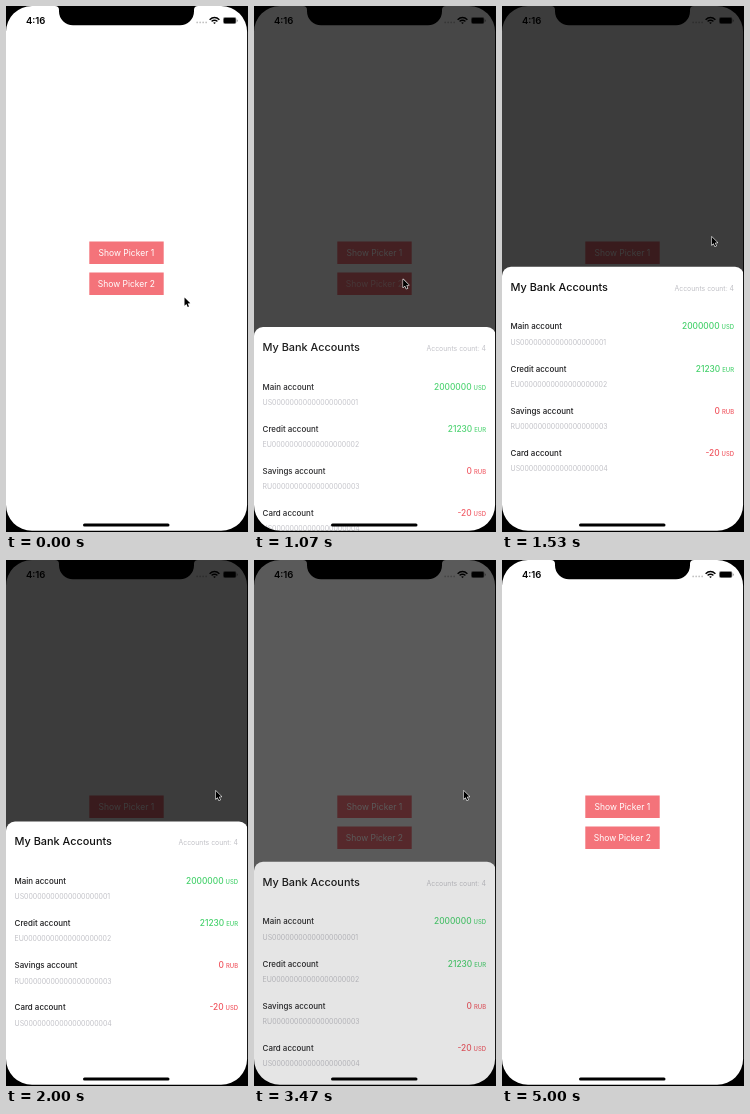
Animation of 242 by 526 pixels, one loop 5140 ms. Source, as an HTML page with a canvas:

```html
<!DOCTYPE html>
<html lang="en">
<head>
<meta charset="utf-8">
<title>Account picker</title>
<style>
  html, body { margin: 0; width: 100%; height: 100%; overflow: hidden; background: #000; }
  canvas { display: block; width: 242px; height: 526px; }
</style>
</head>
<body>
<canvas id="stage"></canvas>
<script>
const W = 242, H = 526, LOOP = 5140, TICK = 1000 / 15;
const SHEET_TOP = 261.5, SHEET_H = H - SHEET_TOP, DIM = 0.765;
const OPEN_AT = 872, FADE_MS = 255, CLOSE_AT = 3423, CLOSE_MS = 177;
const FONT = 'Inter, "Liberation Sans", sans-serif';
const CORAL = '#f4737a', GREEN = '#46d16c', RED = '#f0555f', MUTED = '#c0c0c6';

const ACCOUNTS = [
  ['Main account', 'US', '2000000', 'USD', GREEN],
  ['Credit account', 'EU', '21230', 'EUR', GREEN],
  ['Savings account', 'RU', '0', 'RUB', RED],
  ['Card account', 'US', '-20', 'USD', RED]
];

// time, x, y of the pointer tip
const POINTER = [
  [200, 178.5, 291.5], [467, 133, 276], [600, 131.2, 279.5],
  [1000, 131.2, 279.5], [1267, 203, 254.5], [1400, 209, 235], [1533, 209.7, 230.8],
  [3600, 209.7, 230.8], [3725, 246, 224]
];

const ratio = window.devicePixelRatio || 1;

function context(canvas) {
  canvas.width = W * ratio;
  canvas.height = H * ratio;
  const c = canvas.getContext('2d');
  c.scale(ratio, ratio);
  return c;
}

const ctx = context(document.getElementById('stage'));
const sheet = context(document.createElement('canvas'));

const clamp = v => Math.max(0, Math.min(1, v));
const smooth = u => u * u * (3 - 2 * u);

function text(c, str, x, y, size, color, weight = 400, align = 'left') {
  c.font = `${weight} ${size}px ${FONT}`;
  c.textAlign = align;
  c.fillStyle = color;
  c.fillText(str, x, y);
  return c.measureText(str).width;
}

function box(c, x, y, w, h, r, color) {
  c.beginPath();
  c.roundRect(x, y, w, h, r);
  c.fillStyle = color;
  c.fill();
}

// Underdamped spring from 0 to 1
function spring(t) {
  if (t <= 0) return 0;
  const zeta = 0.72, wd = 7.8, decay = wd * zeta / Math.sqrt(1 - zeta * zeta);
  return 1 - Math.exp(-decay * t) * (Math.cos(wd * t) + decay / wd * Math.sin(wd * t));
}

function pointerAt(t) {
  const i = POINTER.findIndex(p => p[0] > t);
  if (i < 0) return null;
  if (i === 0) return POINTER[0].slice(1);
  const [t0, x0, y0] = POINTER[i - 1], [t1, x1, y1] = POINTER[i];
  const u = (t - t0) / (t1 - t0);
  return [x0 + (x1 - x0) * u, y0 + (y1 - y0) * u];
}

function drawButton(label, y, ink) {
  box(ctx, 83.3, y, 74.4, 22.4, 0, CORAL);
  text(ctx, label, 120.4, y + 14.5, 8.5, `rgba(255,255,255,${ink})`, 400, 'center');
}

// Painted on its own layer so that it fades as one piece
function drawSheet(top, alpha, ink) {
  sheet.globalAlpha = 1;
  sheet.clearRect(0, 0, W, H);
  box(sheet, 0, top, W, H - top + 20, [9, 9, 0, 0], '#fff');
  sheet.globalAlpha = ink;
  text(sheet, 'My Bank Accounts', 8.5, top + 23.8, 10.9, '#111', 500);
  text(sheet, 'Accounts count: 4', 232, top + 23.8, 6.9, MUTED, 400, 'right');
  ACCOUNTS.forEach(([name, country, sum, unit, color], i) => {
    const y = top + 62.6 + i * 42.1;
    text(sheet, name, 8.6, y, 7.95, '#1c1c1e', 500);
    text(sheet, country + '0'.repeat(19) + (i + 1), 8.5, y + 15.3, 6.95, MUTED);
    const w = text(sheet, unit, 232, y, 5.9, color, 500, 'right');
    text(sheet, sum, 230 - w, y, 8.4, color, 500, 'right');
  });
  ctx.globalAlpha = alpha;
  ctx.drawImage(sheet.canvas, 0, 0, W, H);
  ctx.globalAlpha = 1;
}

function drawStatus() {
  text(ctx, '4:16', 20, 18, 9.5, '#000', 600);
  for (let i = 0; i < 4; i++) box(ctx, 190.3 + i * 3, 15.6, 1.7, 1.7, 0.85, 'rgba(0,0,0,.25)');

  ctx.save();
  ctx.beginPath();
  ctx.moveTo(208.5, 18);
  ctx.arc(208.5, 18, 8, -Math.PI * 0.77, -Math.PI * 0.23);
  ctx.closePath();
  ctx.clip();
  ctx.strokeStyle = '#000';
  ctx.lineWidth = 1.5;
  for (const r of [1, 3.8, 6.4]) {
    ctx.beginPath();
    ctx.arc(208.5, 18, r, Math.PI, 0);
    ctx.stroke();
  }
  ctx.restore();

  box(ctx, 217, 11.1, 13.4, 7, 2, 'rgba(0,0,0,.45)');
  box(ctx, 217.8, 11.9, 11.8, 5.4, 1.2, '#000');
  box(ctx, 230.9, 13.5, 0.9, 2.2, 0.5, 'rgba(0,0,0,.4)');
}

function drawFrame() {
  ctx.fillStyle = '#000';
  ctx.beginPath();
  ctx.rect(0, 0, W, H);
  ctx.roundRect(0, 0, 241.1, 524.8, 26);
  ctx.fill('evenodd');

  ctx.beginPath();
  ctx.moveTo(49, 0);
  ctx.arcTo(53, 0, 53, 4, 4);
  ctx.arcTo(53, 19.3, 70, 19.3, 14);
  ctx.arcTo(188, 19.3, 188, 4, 14);
  ctx.arcTo(188, 0, 192, 0, 4);
  ctx.fill();
  box(ctx, 77, 517.4, 86.5, 3, 1.5, '#000');
}

function drawPointer([x, y]) {
  ctx.beginPath();
  ctx.moveTo(x, y);
  for (const [dx, dy] of [[0, 8.2], [1.9, 6.5], [3.2, 9.5], [4.5, 8.9], [3.2, 6], [5.8, 5.8]]) {
    ctx.lineTo(x + dx, y + dy);
  }
  ctx.closePath();
  ctx.lineJoin = 'round';
  ctx.lineWidth = 1.1;
  ctx.strokeStyle = '#fff';
  ctx.stroke();
  ctx.fillStyle = '#000';
  ctx.fill();
}

function draw(t) {
  ctx.fillStyle = '#fff';
  ctx.fillRect(0, 0, W, H);

  const pressed = t > 930 && t < 1300;
  drawButton('Show Picker 1', 235.6, 1);
  drawButton('Show Picker 2', 266.6, pressed ? clamp(0.25 + (t - 933) / 400) : 1);
  drawStatus();

  const left = 1 - smooth(clamp((t - CLOSE_AT) / CLOSE_MS));
  if (t > OPEN_AT && left > 0) {
    const fade = 1 - (1 - clamp((t - OPEN_AT) / FADE_MS)) ** 2;
    ctx.fillStyle = `rgba(0,0,0,${DIM * fade * left})`;
    ctx.fillRect(0, 0, W, H);
    const shown = spring((t - OPEN_AT) / 1000) * left;
    drawSheet(H - SHEET_H * shown, left, fade);
  }

  drawFrame();
  const tip = pointerAt(t);
  if (tip) drawPointer(tip);
}

const start = performance.now();
function loop() {
  const t = (performance.now() - start) % LOOP;
  // the picture advances 15 times per second
  draw(Math.floor((t + 4) / TICK) % 77 * TICK);
  requestAnimationFrame(loop);
}
loop();
</script>
</body>
</html>
```
